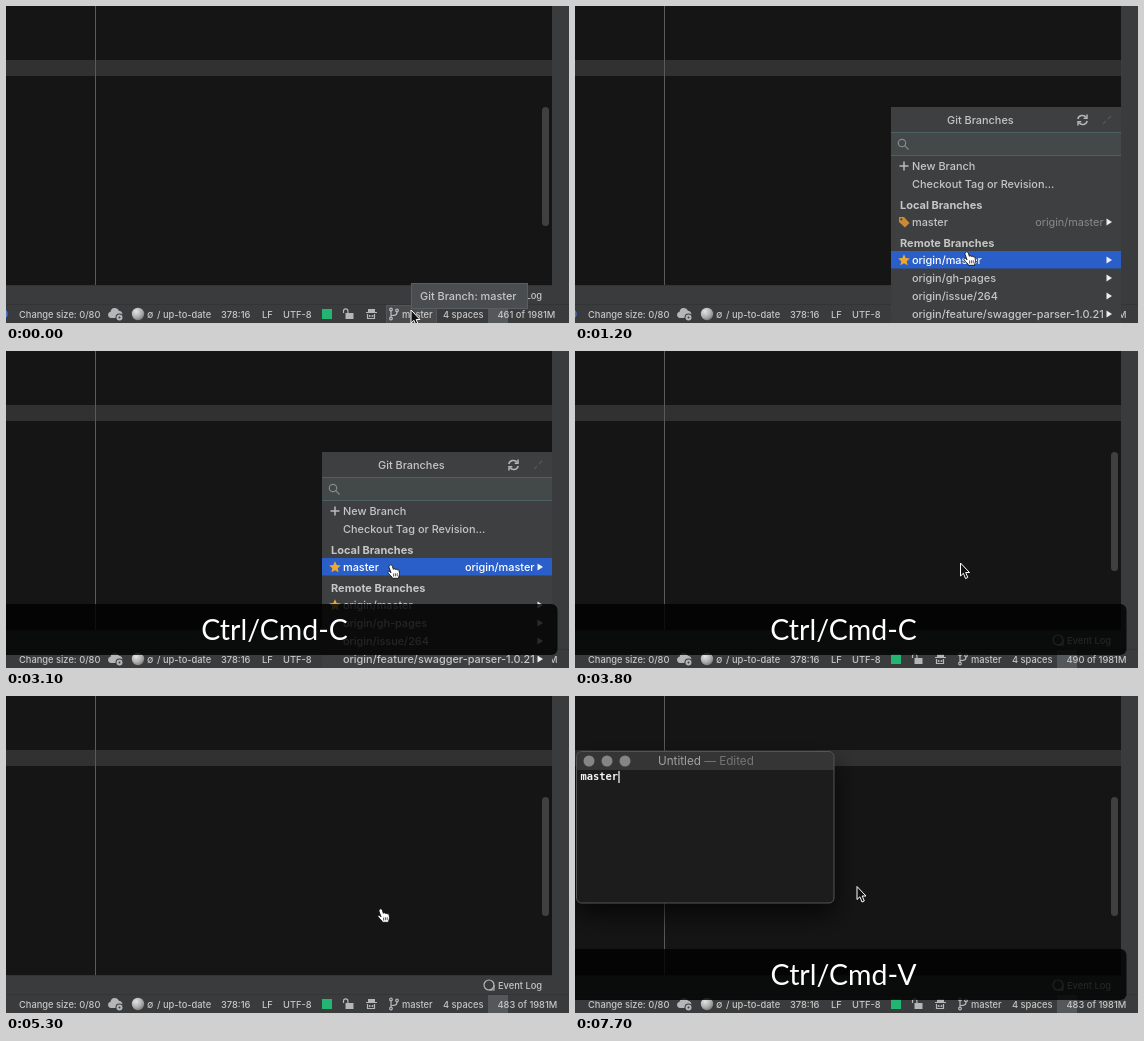
An HTML page that plays this animation: 563 by 317 pixels, repeating every 8000 ms.

```html
<!DOCTYPE html>
<html lang="en">
<head>
<meta charset="utf-8">
<title>Copy branch name</title>
<style>
  html, body { margin: 0; width: 100%; height: 100%; overflow: hidden; background: #151515; }
  svg { display: block; width: 100vw; height: 100vh; }
  text { font: 500 10.9px Inter, sans-serif; fill: #c6c6c6; white-space: pre; }
  .small { font-size: 9.3px; }
  .head { font-weight: 700; font-size: 11px; }
  .dim { fill: #8a8a8a; font-weight: 400; }
  .on { fill: #fff; }
  .icon { fill: none; stroke: #b4b6b8; stroke-width: 1.2; }
  .solid { fill: #b4b6b8; }
  .keys { font: 28.5px Lato, sans-serif; fill: #fff; text-anchor: middle; }
  .mono { font: bold 10.4px "DejaVu Sans Mono", monospace; fill: #f4f4f4; }
  .title { font-size: 11.7px; font-weight: 400; fill: #a2a2a2; }
</style>
</head>
<body>
<svg viewBox="0 0 563 317" preserveAspectRatio="none">
  <defs>
    <radialGradient id="ball" cx=".35" cy=".3" r=".8">
      <stop offset="0" stop-color="#e4e4e4"/><stop offset=".6" stop-color="#acacac"/><stop offset="1" stop-color="#707070"/>
    </radialGradient>
    <filter id="shadow" x="-25%" y="-25%" width="150%" height="170%">
      <feDropShadow dx="0" dy="12" stdDeviation="13" flood-color="#000" flood-opacity=".7"/>
    </filter>
    <path id="star" d="M0-5.8 1.7-2 5.800-1.600 2.700 1.200 3.600 5.300 0 3.200-3.600 5.300-2.700 1.200-5.800-1.600-1.700-2z" fill="#f0a732"/>
    <g id="tag">
      <path d="M-5-5H0L5.500 1 1 5.500-5 0z" fill="#c98a35"/><circle cx="-2.700" cy="-2.700" r="1.100" fill="#3d3f41"/>
    </g>
  </defs>

  <!-- Editor -->
  <rect width="563" height="317" fill="#151515"/>
  <rect y="54" width="546" height="16" fill="#313131"/>
  <path d="M89.500 0V279" stroke="#5a5a5a"/>
  <rect x="536" y="101" width="7" height="119" rx="3.500" fill="#404040"/>
  <path d="M546 0H563V317H0V279H546z" fill="#393b3d"/>
  <path d="M0 279.500H546M0 298.500H563" stroke="#323436"/>

  <!-- Status bar -->
  <circle id="spinner" cx="-4" cy="308" r="5" fill="none" stroke-width="1.500"/>
  <g class="icon">
    <circle cx="483" cy="289" r="5"/><path d="M483 294H488V289"/>
    <path d="M337.500 307V305a2.200 2.200 0 0 1 4.400 0V308"/>
    <path d="M385 304V312M385 309.500C391 309.500 391 308 391 305.500"/>
    <circle cx="385" cy="303.500" r="1.300"/><circle cx="385" cy="312.500" r="1.300"/><circle cx="391" cy="304.500" r="1.300"/>
    <path d="M360 306.500H371M361.500 308V312.500H368.500V308"/>
  </g>
  <g class="solid">
    <path d="M105 312a3.200 3.200 0 0 1-.5-6.300 4.500 4.500 0 0 1 8.500-1 3.600 3.600 0 0 1 3 5.300L113 312z"/>
    <circle cx="113.500" cy="311.500" r="4" fill="#393b3d"/><circle cx="113.500" cy="311.500" r="3"/>
    <circle cx="113.500" cy="311.500" r="1" fill="#393b3d"/>
    <rect x="339.500" y="307" width="8" height="6"/>
    <path d="M362 306V303H369V306z"/>
    <circle cx="363.700" cy="310" r="1"/><circle cx="366.500" cy="310" r="1"/>
  </g>
  <circle cx="132" cy="308" r="6.200" fill="url(#ball)"/>
  <rect x="316" y="303" width="10" height="10" fill="#25b573"/>
  <rect x="482" y="299" width="20" height="18" fill="#55585b"/>
  <g id="status"></g>
  <text id="memory" class="small" x="491.500" y="311.500"></text>

  <g id="tooltip">
    <rect x="380.500" y="299.500" width="50" height="18" fill="#fff" fill-opacity=".08" stroke="#54575a"/>
    <rect x="405.500" y="277.500" width="116" height="25" fill="#4a4d4f" stroke="#5a5d5f"/>
    <text x="414" y="293.500">Git Branch: master</text>
  </g>

  <g id="popup">
    <rect x="316" y="101" width="230" height="216" fill="#3d3f41"/>
    <rect x="316" y="126" width="230" height="23.500" fill="#434849"/>
    <path d="M316 126.500H546M316 149.500H546" stroke="#4f6062"/>
    <text x="372" y="117.500">Git Branches</text>
    <g class="icon">
      <g stroke-width="1.500">
        <path d="M502.800 113A4.700 4.700 0 0 1 511 111.200M512.200 115A4.700 4.700 0 0 1 504 116.800"/>
        <path d="M512 108.500V112.300H508.700M503 119.500V115.700H506.300"/>
      </g>
      <path d="M528 118 531 115M533 113 536 110" opacity=".2"/>
      <g opacity=".6"><circle cx="327" cy="137" r="3.700"/><path d="M329.700 139.700 333.500 143.500"/></g>
    </g>
    <g id="rows"></g>
  </g>

  <g id="window">
    <g filter="url(#shadow)">
      <rect x="1.500" y="55.500" width="257.500" height="151.500" rx="5" fill="#1d1d1d"/>
    </g>
    <path d="M1.500 74V60.500a5 5 0 0 1 5-5H254a5 5 0 0 1 5 5V74z" fill="#353535"/>
    <rect x="1.500" y="55.500" width="257.500" height="151.500" rx="5" fill="none" stroke="#555"/>
    <g fill="#858585"><circle cx="14" cy="65" r="5.500"/><circle cx="32" cy="65" r="5.500"/><circle cx="50" cy="65" r="5.500"/></g>
    <text class="title" x="83" y="69">Untitled<tspan fill="#757575"> — Edited</tspan></text>
    <text class="mono" id="pasted" x="5.500" y="83.500">master</text>
    <rect id="caret" y="75" width="1.200" height="12" fill="#fff"/>
  </g>

  <g id="overlay">
    <rect x="-10" y="253" width="561.500" height="51" rx="6" fill="#000" fill-opacity=".82"/>
    <text id="keys" class="keys" x="268.500" y="288.500"></text>
  </g>

  <path id="arrow" d="M0 0V13L2.900 10.300 5 15.500 7.300 14.500 5.200 9.500H9z" fill="#111" stroke="#fff"/>
  <g id="hand" stroke="#111" stroke-width=".9">
    <path d="M2.700 1.300c1-1 2.300-.2 2.700 1l1 3c.4-.8 1.600-.8 2 .2.6-.6 1.700-.3 1.900.5.8-.4 1.700 0 1.800.8l.4 2.800c.1 1.800-.9 2.500-.9 4.700H5.500c-.5-2-3-3.300-4.500-5.700-.6-1.200.8-2 2-.8l1 1L2 3.300c-.2-.8.1-1.500.7-2z" fill="#fff"/>
    <path d="M6.600 9.500v3M8.400 9.300v3M10.200 9.200v3" stroke-width=".7"/>
  </g>
</svg>

<script>
const LOOP = 8000, STEP = 100;
const $ = id => document.getElementById(id);
const show = (id, visible) => { $(id).style.display = visible ? '' : 'none'; };
const label = (x, y, text, cls = '') => `<text x="${x}" y="${y}" class="${cls}">${text}</text>`;

$('status').innerHTML = [
  [13, 'Change size: 0/80'], [141, '∅'], [151, '/ up-to-date'], [215, '378:16'], [256, 'LF'],
  [277, 'UTF-8'], [396, 'master'], [437, '4 spaces']
].map(([x, text]) => label(x, 311.5, text, 'small')).join('') + label(492, 292.5, 'Event Log', 'small');

const ROWS = [
  { y: 160, text: 'New Branch', icon: 'plus' },
  { y: 178, text: 'Checkout Tag or Revision...' },
  { y: 199, text: 'Local Branches', head: true },
  { y: 216, text: 'master', icon: 'tag', tracked: 'origin/master', menu: true },
  { y: 237, text: 'Remote Branches', head: true },
  { y: 254, text: 'origin/master', icon: 'star', menu: true },
  { y: 272, text: 'origin/gh-pages', menu: true },
  { y: 290, text: 'origin/issue/264', menu: true },
  { y: 308, text: 'origin/feature/swagger-parser-1.0.21', menu: true }
];

function drawRow(row, selected) {
  const { y, text, icon, head, tracked, menu } = row;
  const baseline = y + 4;
  let out = selected ? `<rect x="316" y="${y - 9}" width="230" height="17.5" fill="#2a5fc9"/>` : '';
  if (icon === 'plus')
    out += `<path d="M324.500 ${y}h9m-4.500-4.500v9" stroke="${selected ? '#d9cf86' : '#bbb'}" stroke-width="1.5"/>`;
  else if (icon)
    out += `<use href="#${selected ? 'star' : icon}" x="329" y="${y}"/>`;
  out += label(head ? 325 : 337, baseline, text, head ? 'head' : selected ? 'on' : '');
  if (tracked)
    out += `<text x="528.5" y="${baseline}" text-anchor="end" class="${selected ? 'on' : 'dim'}">${tracked}</text>`;
  if (menu) out += `<path d="M531.500 ${y - 3.5}l5.500 3.500-5.500 3.500z" fill="#eee"/>`;
  return out;
}

// Pointer path: time, x, y
const PATH = [
  [0, 405, 304], [100, 405, 304], [200, 402, 305], [900, 391, 250], [1200, 388, 245], [1600, 381, 213],
  [3700, 381, 213], [3800, 385.5, 212], [4100, 385.5, 212], [4200, 371, 212],
  [6000, 371, 212], [6500, 282, 190.5], [LOOP, 282, 190.5]
];

function pointerAt(t) {
  const i = PATH.findIndex(p => p[0] > t);
  const [t0, x0, y0] = PATH[i - 1], [t1, x1, y1] = PATH[i];
  const k = (t - t0) / (t1 - t0);
  return [x0 + (x1 - x0) * k, y0 + (y1 - y0) * k];
}

function selectedRow(t, y) {
  if (t < 300) return 0;
  return y > 297 ? 8 : y > 279 ? 7 : y > 261 ? 6 : y > 224 ? 5 : 3;
}

let drawnRow = -1;
function render(time) {
  const t = Math.floor(time / STEP) * STEP;
  const [x, y] = pointerAt(t);
  const within = (from, to) => t >= from && t < to;

  show('tooltip', t < 100);
  show('popup', within(100, 3800));
  const selected = selectedRow(t, y);
  if (selected !== drawnRow) {
    $('rows').innerHTML = ROWS.map((row, i) => drawRow(row, i === selected)).join('');
    drawnRow = selected;
  }

  show('spinner', t < 3100);
  $('spinner').setAttribute('stroke', t < 1600 ? '#477de0' : '#77797c');
  $('memory').textContent = `${t < 100 ? 461 : t < 5300 ? 490 : 483} of 1981M`;

  const pasted = t >= 6500;
  show('window', t >= 5700);
  show('pasted', pasted);
  show('caret', !within(7100, 7700));
  $('caret').setAttribute('x', pasted ? 43.4 : 5.5);

  show('overlay', within(2500, 4400) || pasted);
  $('keys').textContent = 'Ctrl/Cmd-' + (pasted ? 'V' : 'C');

  const hand = within(200, 3800) || within(4200, 6100);
  show('hand', hand);
  show('arrow', !hand);
  $(hand ? 'hand' : 'arrow').setAttribute('transform', `translate(${x} ${y})`);
}

const start = performance.now();
function tick() {
  render((performance.now() - start) % LOOP);
  requestAnimationFrame(tick);
}
tick();
</script>
</body>
</html>
```
